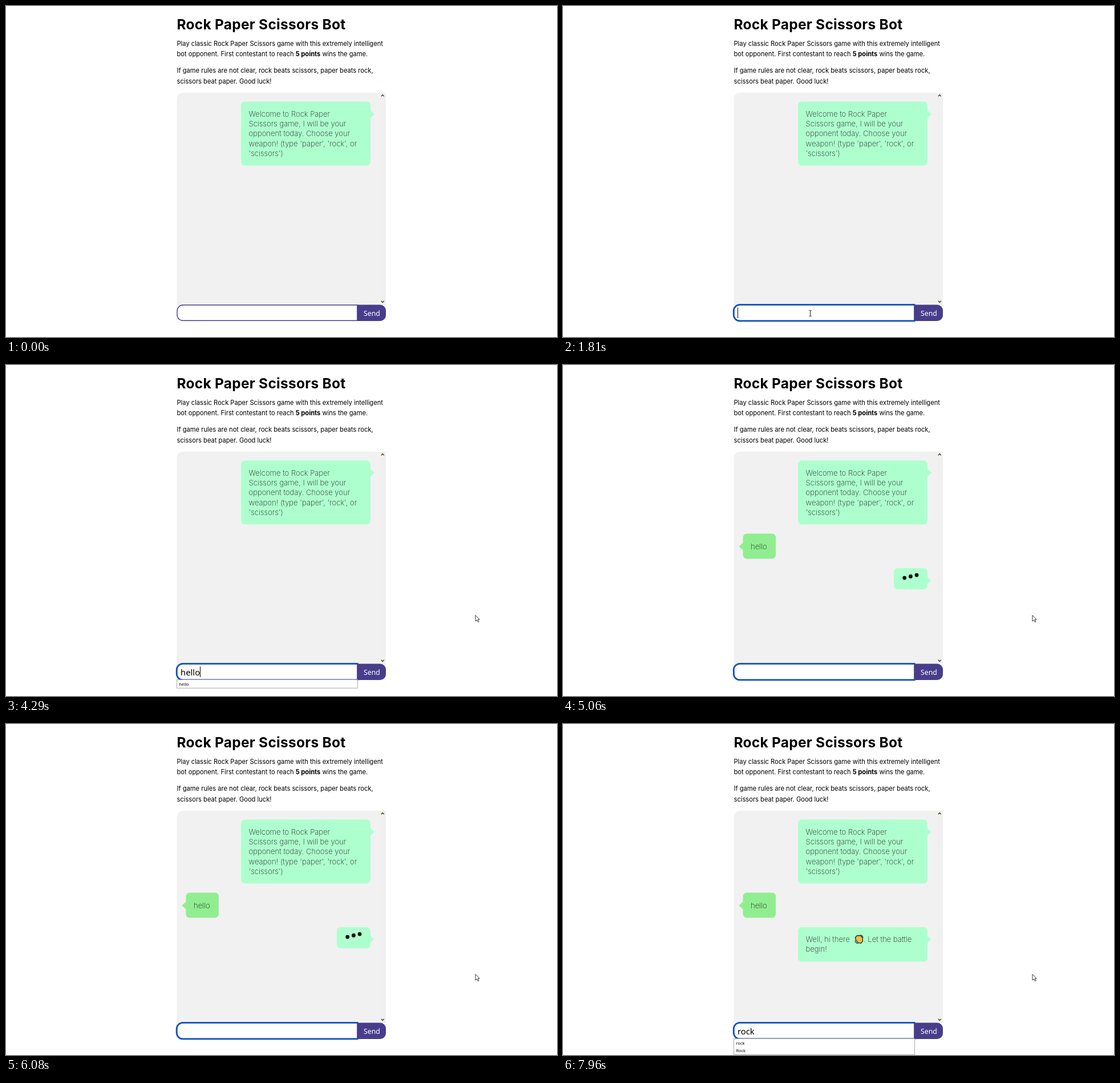
An HTML page that plays this animation: 966 by 580 pixels, repeating every 8 s.

```html
<!DOCTYPE html>
<html lang="en">
<head>
<meta charset="utf-8">
<title>Rock Paper Scissors Bot</title>
<style>
  html, body { margin: 0; width: 100%; height: 100%; overflow: hidden; background: #fff; }
  svg { display: block; width: 966px; height: 580px; }
  text { font-family: Inter, "Open Sans", sans-serif; white-space: pre; }
  .title { font-size: 24.5px; font-weight: 700; letter-spacing: .25px; }
  .intro { font-size: 11.15px; font-weight: 400; fill: #000; }
  .intro .strong { font-weight: 700; }
  .chat { font-size: 13.1px; font-weight: 200; fill: #222; }
  .ui { font-family: "Noto Sans", "Open Sans", sans-serif; }
  .bot { fill: #aeffce; }
  .user { fill: #90ee90; }
</style>
</head>
<body>
<svg viewBox="0 0 966 580">
  <text class="title" x="299.5" y="41">Rock Paper Scissors Bot</text>
  <g class="intro">
    <text x="299.5" y="70">Play classic Rock Paper Scissors game with this extremely intelligent</text>
    <text x="299.5" y="88">bot opponent. First contestant to reach <tspan class="strong">5 points</tspan> wins the game.</text>
    <text x="299.5" y="117">If game rules are not clear, rock beats scissors, paper beats rock,</text>
    <text x="299.5" y="135.5">scissors beat paper. Good luck!</text>
  </g>

  <path d="M299.5 524V162a10 10 0 0 1 10-10H666V524Z" fill="#f1f1f1"/>
  <path d="M656 152h10v372h-10z" fill="#f0f0f0"/>
  <path d="M657.8 158.3l2.5-2.6 2.5 2.6M657.8 516.7l2.5 2.6 2.5-2.6" fill="none" stroke="#4d4d22" stroke-width="1.5"/>

  <path class="bot" d="M638 182l8 7.2-8 7.2z"/>
  <rect class="bot" x="412" y="167.5" width="227" height="112" rx="6.5"/>
  <g class="chat">
    <text x="425.5" y="194">Welcome to Rock Paper</text>
    <text x="425.5" y="211">Scissors game, I will be your</text>
    <text x="425.5" y="228.3">opponent today. Choose your</text>
    <text x="425.5" y="245.5">weapon! (type 'paper', 'rock', or</text>
    <text x="425.5" y="262.5">'scissors')</text>
  </g>

  <g id="greeting">
    <path class="user" d="M316 311l-7.5 7 7.5 7z"/>
    <rect class="user" x="315.5" y="295.5" width="57.5" height="44" rx="6.5"/>
    <text class="chat" x="329" y="322.5">hello</text>
  </g>

  <path id="tail" class="bot" d="M638 370.5l7 7-7 7z"/>
  <g id="typing">
    <rect class="bot" x="580" y="356" width="59" height="37" rx="6.5"/>
    <g id="dots"><circle cx="598.7" r="3.4"/><circle cx="609.4" r="3.4"/><circle cx="620" r="3.4"/></g>
  </g>
  <g id="reply">
    <rect class="bot" x="412" y="356" width="227" height="60.5" rx="6.5"/>
    <g class="chat">
      <text x="425.5" y="382">Well, hi there</text>
      <text x="527" y="382">. Let the battle</text>
      <text x="425.5" y="399">begin!</text>
    </g>
    <path d="M512.5 374l3-3.2 6-.3 3.7 4 .2 6-3 3.7-4.5-.8-4.4-4.5z" fill="#f5bd45" stroke="#222" stroke-width="1.3" stroke-linejoin="round"/>
    <path d="M512 379.5q1 4.5 5.5 5M521 370q4 .2 5 4" fill="none" stroke="#245b66" stroke-width="1.5"/>
  </g>

  <path fill="#fff" d="M616 524H310a10 10 0 0 0-10 10v7.2a10 10 0 0 0 10 10H616Z" stroke="#483d8b" stroke-width="1.4"/>
  <path id="ring" fill="none" d="M617.5 523.2H310a11 11 0 0 0-11 11v6.8a11 11 0 0 0 11 11H617.5" stroke="#0f58c4" stroke-width="2.4"/>
  <path d="M615.5 523.5H656a10 10 0 0 1 10 10v8.5a10 10 0 0 1-10 10H615.5Z" fill="#483d8b"/>
  <text class="ui" x="627" y="542.7" font-size="12.3" font-weight="500" fill="#fff">Send</text>
  <text id="entry" class="ui" x="306" y="543.7" font-size="14.8"></text>
  <path id="caret" d="M0 528.5V547" stroke="#000"/>

  <g id="menu">
    <rect id="menuBox" x="299.5" y="551.5" width="317" fill="#fff" stroke="#aaa"/>
    <text id="option0" class="ui" x="303.5" y="562" font-size="7.4"></text>
    <text id="option1" class="ui" x="303.5" y="575" font-size="7.4"></text>
  </g>

  <path id="arrow" d="M.5.5V11L3 8.7l1.8 3.8 1.7-.8L4.7 8H7.8Z" fill="#fff" stroke="#222" stroke-width=".9"/>
  <path id="beam" d="M-2.2-5H-.6L0-4.5.6-5H2.2M0-4.5V4.5M-2.2 5H-.6L0 4.5.6 5H2.2" fill="none" stroke="#222" stroke-width="1"/>
</svg>
<script>
const LOOP = 8000, BLINK = 530;
const FOCUS = 1480, SENT = 4570, THINK = 4640, ANSWER = 6140;
const el = Object.fromEntries([...document.querySelectorAll('[id]')].map(n => [n.id, n]));

// [start, value]
const entries = [[0, ''], [3550, 'h'], [3820, 'he'], [3960, 'hel'], [4090, 'hell'], [4220, 'hello'],
  [SENT, ''], [7400, 'r'], [7540, 'ro'], [7690, 'roc'], [7760, 'rock']];
const menus = [[0, []], [3620, ['hello', 'hi']], [3890, ['hello']], [SENT, []], [7470, ['rock', 'Rock']]];
const blinkStarts = [[0, 0], [FOCUS, FOCUS], [3550, 3550], [3820, 3820], [4220, 4220], [7400, 7400]];

// [time, x, y]
const pointerPath = [[120, 901, 567], [400, 720, 506], [610, 555, 489], [870, 434, 513],
  [1000, 427, 528], [1150, 433.5, 538.5], [1840, 433.5, 538.5], [1940, 530, 514],
  [2050, 740, 459], [2150, 822.5, 438]];

const at = (steps, t) => steps.findLast(([start]) => start <= t)[1];
const show = (node, on) => node.setAttribute('display', on ? 'inline' : 'none');

function pointerAt(t) {
  const next = pointerPath.findIndex(([time]) => time > t);
  if (next < 0) return pointerPath.at(-1).slice(1);
  if (next === 0) return pointerPath[0].slice(1);
  const [t0, x0, y0] = pointerPath[next - 1], [t1, x1, y1] = pointerPath[next];
  const k = (t - t0) / (t1 - t0);
  return [x0 + (x1 - x0) * k, y0 + (y1 - y0) * k];
}

function drawPointer(t) {
  const [x, y] = pointerAt(t);
  const overField = x > 299 && x < 616 && y > 522 && y < 553;
  show(el.arrow, t >= 120 && !overField);
  show(el.beam, t >= 120 && overField);
  for (const node of [el.arrow, el.beam]) node.setAttribute('transform', `translate(${x} ${y})`);
}

function drawField(t) {
  show(el.ring, t >= FOCUS);
  const value = at(entries, t);
  if (el.entry.textContent !== value) el.entry.textContent = value;
  const width = value ? el.entry.getComputedTextLength() : 0;
  const lit = Math.floor((t - at(blinkStarts, t)) / BLINK) % 2 === 0;
  el.caret.setAttribute('transform', `translate(${Math.floor(306 + width) + .5} 0)`);
  show(el.caret, t >= FOCUS && lit);
}

function drawMenu(t) {
  const options = at(menus, t);
  show(el.menu, options.length > 0);
  el.menuBox.setAttribute('height', 1.5 + 13.2 * options.length);
  el.option0.textContent = options[0] || '';
  el.option1.textContent = options[1] || '';
}

function drawChat(t) {
  show(el.greeting, t >= SENT);
  show(el.tail, t >= THINK);
  show(el.typing, t >= THINK && t < ANSWER);
  show(el.reply, t >= ANSWER);
  [...el.dots.children].forEach((dot, i) => {
    const phase = (t - 5060) / 1020 * 2 * Math.PI + .42 - i * .53;
    dot.setAttribute('cy', 371 + 5 * Math.sin(phase));
  });
}

function render(t) {
  drawChat(t);
  drawField(t);
  drawMenu(t);
  drawPointer(t);
}

const begin = performance.now();
function tick() {
  render((performance.now() - begin) % LOOP);
  requestAnimationFrame(tick);
}
tick();
</script>
</body>
</html>
```
